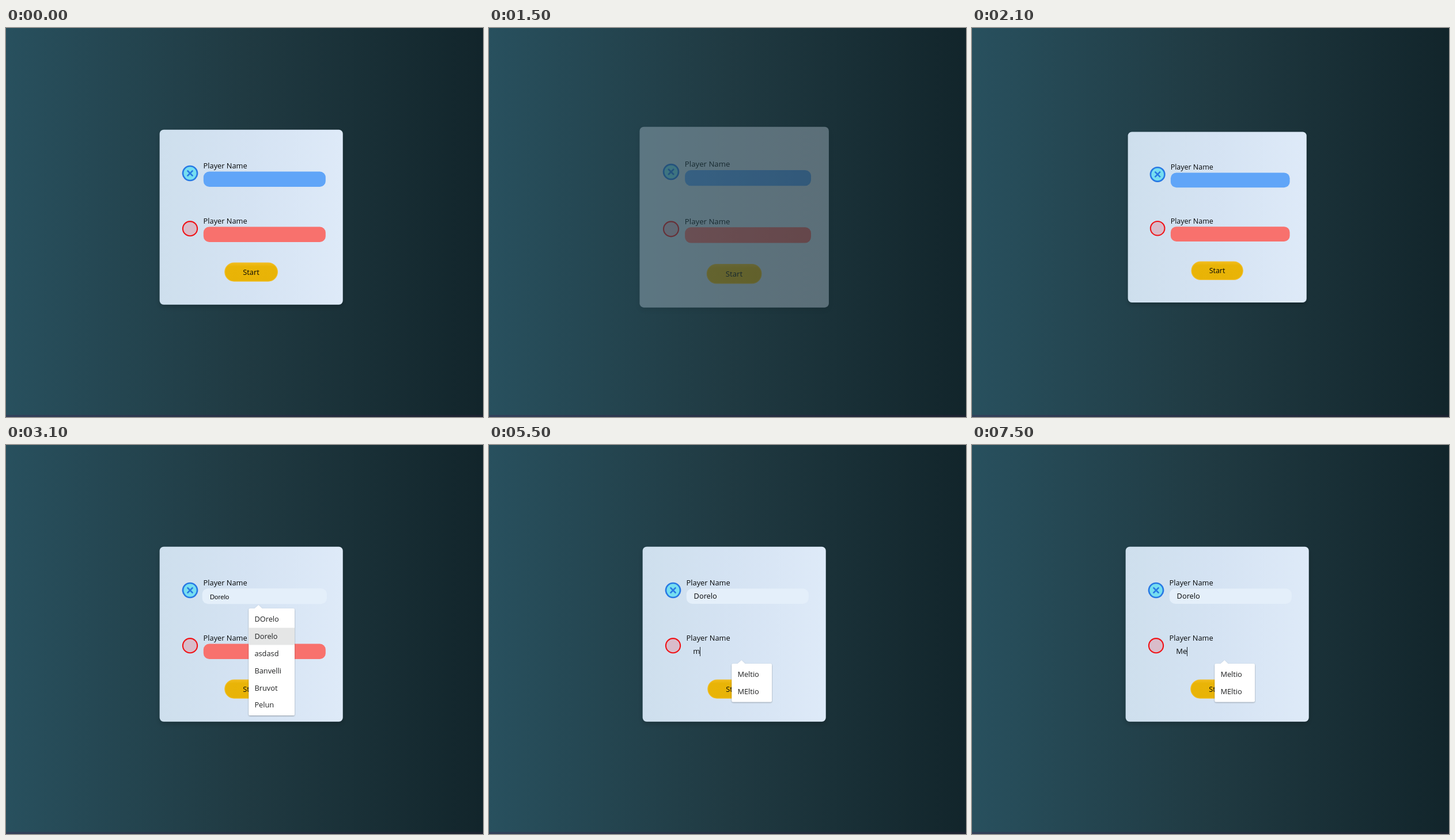
An HTML page that plays this animation: 828x676 px, repeating every 8000 ms.

```html
<!DOCTYPE html>
<html lang="en">
<head>
<meta charset="utf-8">
<title>Player form</title>
<style>
  html, body { margin: 0; width: 100%; height: 100%; overflow: hidden; background: #203a43; }
  svg { display: block; width: 828px; height: 676px; }
  text { font: 12.8px "Open Sans", "Noto Sans", sans-serif; fill: #050708; white-space: pre; }
  .preview { font: 11.25px "Liberation Sans", sans-serif; }
  .option { fill: #1f2021; }
</style>
</head>
<body>
<svg viewBox="0 0 828 676">
  <defs>
    <linearGradient id="page">
      <stop offset="0" stop-color="#28505e"/>
      <stop offset=".5" stop-color="#203a42"/>
      <stop offset="1" stop-color="#12252b"/>
    </linearGradient>
    <linearGradient id="strip">
      <stop offset="0" stop-color="#33405a"/>
      <stop offset="1" stop-color="#1c2230"/>
    </linearGradient>
    <linearGradient id="panel">
      <stop offset="0" stop-color="#cedfed"/>
      <stop offset=".5" stop-color="#d5e3f3"/>
      <stop offset="1" stop-color="#deeaf8"/>
    </linearGradient>
    <linearGradient id="gold" x2="0" y2="1">
      <stop offset="0" stop-color="#f2bd1d"/>
      <stop offset=".2" stop-color="#e9b407"/>
      <stop offset="1" stop-color="#e8b306"/>
    </linearGradient>
    <filter id="soft" x="-10%" y="-10%" width="120%" height="120%">
      <feDropShadow dx="0" dy="4" stdDeviation="4" flood-opacity=".2"/>
    </filter>
    <filter id="lift" x="-10%" y="-10%" width="120%" height="120%">
      <feDropShadow dx="0" dy="1" stdDeviation="1" flood-opacity=".35"/>
    </filter>
  </defs>

  <rect width="828" height="676" fill="url(#page)"/>
  <rect y="672.5" width="828" height="3.5" fill="url(#strip)"/>

  <g id="card">
    <rect x="266.7" y="176.7" width="318" height="304" rx="7" fill="url(#panel)" filter="url(#soft)"/>

    <circle cx="319.5" cy="252.5" r="12.5" fill="#76def0" stroke="#2879e4" stroke-width="2.7"/>
    <path d="M314.7 247.7l9.6 9.6m0-9.6l-9.6 9.6" stroke="#2879e4" stroke-width="2.6"/>
    <circle cx="319.5" cy="348.7" r="12.6" fill="#d9bcca" stroke="#f01216" stroke-width="2.1"/>

    <text x="342.6" y="244.2">Player Name</text>
    <text x="342.6" y="340.4">Player Name</text>
    <rect id="field1" rx="10"/>
    <rect id="field2" rx="10"/>
    <text id="value1"/>
    <text id="value2" x="354.3" y="363.4" style="font-size:13px"/>
    <rect id="caret" width="1" height="16" fill="#20282e"/>

    <rect x="379.9" y="408.1" width="91.4" height="32" rx="16" fill="url(#gold)" stroke="#f1be2a" stroke-width="1.3"/>
    <text x="425.5" y="428.8" text-anchor="middle">Start</text>
  </g>

  <g id="menu">
    <g filter="url(#lift)">
      <rect id="sheet" x="421.3" rx="2.5" fill="#fff"/>
      <path id="tip" d="M431 .5L438.3 -6L445 .5Z" fill="#fff"/>
    </g>
    <rect id="hover" x="421.3" height="29.8" fill="#e5e6e6"/>
    <g id="options"></g>
  </g>
</svg>

<script>
const LOOP = 8000, STEP = 100, ROW = 29.85;
const POP_START = 1370, POP_TIME = 1000;
const CENTER = [425.7, 328.7];

const $ = id => document.getElementById(id);
const set = (el, attrs) => { for (const k in attrs) el.setAttribute(k, attrs[k]); };
const show = (el, on) => set(el, { visibility: on ? 'visible' : 'hidden' });

const menus = {
  first: { y: 284, width: 79.7, items: ['DOrelo', 'Dorelo', 'asdasd', 'Banvelli', 'Bruvot', 'Pelun'] },
  second: { y: 380, width: 89.6, items: ['Vuri', 'Meltio', 'hgfdfgh', 'MEltio', 'Dorelo', 'Jugador 2'] },
  match: { y: 380, width: 69.7, items: ['Meltio', 'MEltio'] }
};

// Each scene lasts until the next one begins.
const scenes = [
  { at: 0 },
  { at: 2500, focus: 1, menu: 'first', caret: true },
  { at: 3100, focus: 1, menu: 'first', hover: 1, one: 'Dorelo', preview: true },
  { at: 3200, focus: 1, menu: 'first', hover: 2, one: 'asdasd', preview: true },
  { at: 3600, focus: 1, menu: 'first', hover: 1, one: 'Dorelo', preview: true },
  { at: 3900, focus: 1, one: 'Dorelo', caret: true },
  { at: 4400, focus: 2, one: 'Dorelo', menu: 'second', caret: true },
  { at: 5100, focus: 2, one: 'Dorelo', menu: 'second' },
  { at: 5500, focus: 2, one: 'Dorelo', two: 'm', menu: 'match', caret: true },
  { at: 6000, focus: 2, one: 'Dorelo', two: 'me', menu: 'match', caret: true },
  { at: 6600, focus: 2, one: 'Dorelo', two: 'm', menu: 'match', caret: true },
  { at: 6900, focus: 2, one: 'Dorelo', caret: true },
  { at: 7100, focus: 2, one: 'Dorelo', two: 'M', menu: 'match', caret: true },
  { at: 7500, focus: 2, one: 'Dorelo', two: 'Me', menu: 'match', caret: true }
];

const bezier = (a, b, u) => 3 * a * u * (1 - u) ** 2 + 3 * b * u * u * (1 - u) + u ** 3;

// The CSS "ease" curve, solved by bisection.
function ease(x) {
  let lo = 0, hi = 1;
  for (let i = 0; i < 20; i++) {
    const mid = (lo + hi) / 2;
    if (bezier(.25, .25, mid) < x) lo = mid; else hi = mid;
  }
  return bezier(.1, 1, lo);
}

function keyframes(keys, p) {
  for (let i = 1; i < keys.length; i++) {
    const [p0, v0] = keys[i - 1], [p1, v1] = keys[i];
    if (p < p1) return v0 + (v1 - v0) * ease((p - p0) / (p1 - p0));
  }
  return keys[keys.length - 1][1];
}

const POP_SCALE = [[0, .3], [.2, 1.1], [.4, .9], [.6, 1.03], [.8, .97], [1, 1]];
const POP_FADE = [[0, 0], [.6, 1]];

function drawCard(t) {
  const tick = Math.floor(t / STEP) * STEP;
  const p = tick < 1200 ? 1 : Math.min(1, Math.max(0, (tick - POP_START) / POP_TIME));
  const [x, y] = CENTER;
  set($('card'), {
    transform: `translate(${x} ${y}) scale(${keyframes(POP_SCALE, p)}) translate(${-x} ${-y})`,
    opacity: keyframes(POP_FADE, p)
  });
}

function drawField(n, focused, fill) {
  const grow = focused ? 2.1 : 0, y = n === 1 ? 249.5 : 345.6;
  set($('field' + n), {
    x: 342.8 - grow, y: y - grow / 8, width: 212 + 2 * grow, height: 26.4 + grow / 4, fill
  });
}

function drawMenu(name, hover) {
  show($('menu'), name);
  show($('hover'), name && hover !== undefined);
  $('options').replaceChildren();
  if (!name) return;
  const { y, width, items } = menus[name];
  set($('sheet'), { y, width, height: items.length * ROW + 6.8 });
  set($('tip'), { transform: `translate(0 ${y})` });
  if (hover !== undefined) set($('hover'), { y: y + 3.8 + hover * ROW, width });
  items.forEach((label, i) => {
    const el = document.createElementNS('http://www.w3.org/2000/svg', 'text');
    set(el, { x: 431.4, y: y + 23.2 + i * ROW, class: 'option' });
    el.textContent = label;
    $('options').append(el);
  });
}

function drawScene({ focus, menu, hover, caret, preview, one = '', two = '' }) {
  const onFirst = focus === 1, onSecond = focus === 2;
  drawField(1, onFirst, one ? '#e4effa' : onFirst ? 'none' : '#60a5f8');
  drawField(2, onSecond, onSecond ? 'none' : '#f8716d');

  const first = $('value1'), second = $('value2');
  first.textContent = one;
  second.textContent = two;
  set(first, {
    x: onFirst ? 354 : 355.6,
    y: preview ? 267.8 : 267.3,
    class: preview ? 'preview' : ''
  });

  const active = onFirst ? first : second;
  const end = active.textContent ? active.getComputedTextLength() : 0;
  show($('caret'), caret);
  set($('caret'), { x: 354 + Math.round(end), y: onFirst ? 255 : 351 });
  drawMenu(menu, hover);
}

let current;
function render(t) {
  drawCard(t);
  const scene = scenes.findLast(s => s.at <= t);
  if (scene !== current) drawScene(current = scene);
}

const start = performance.now();
function loop() {
  render((performance.now() - start) % LOOP);
  requestAnimationFrame(loop);
}
loop();
</script>
</body>
</html>
```
